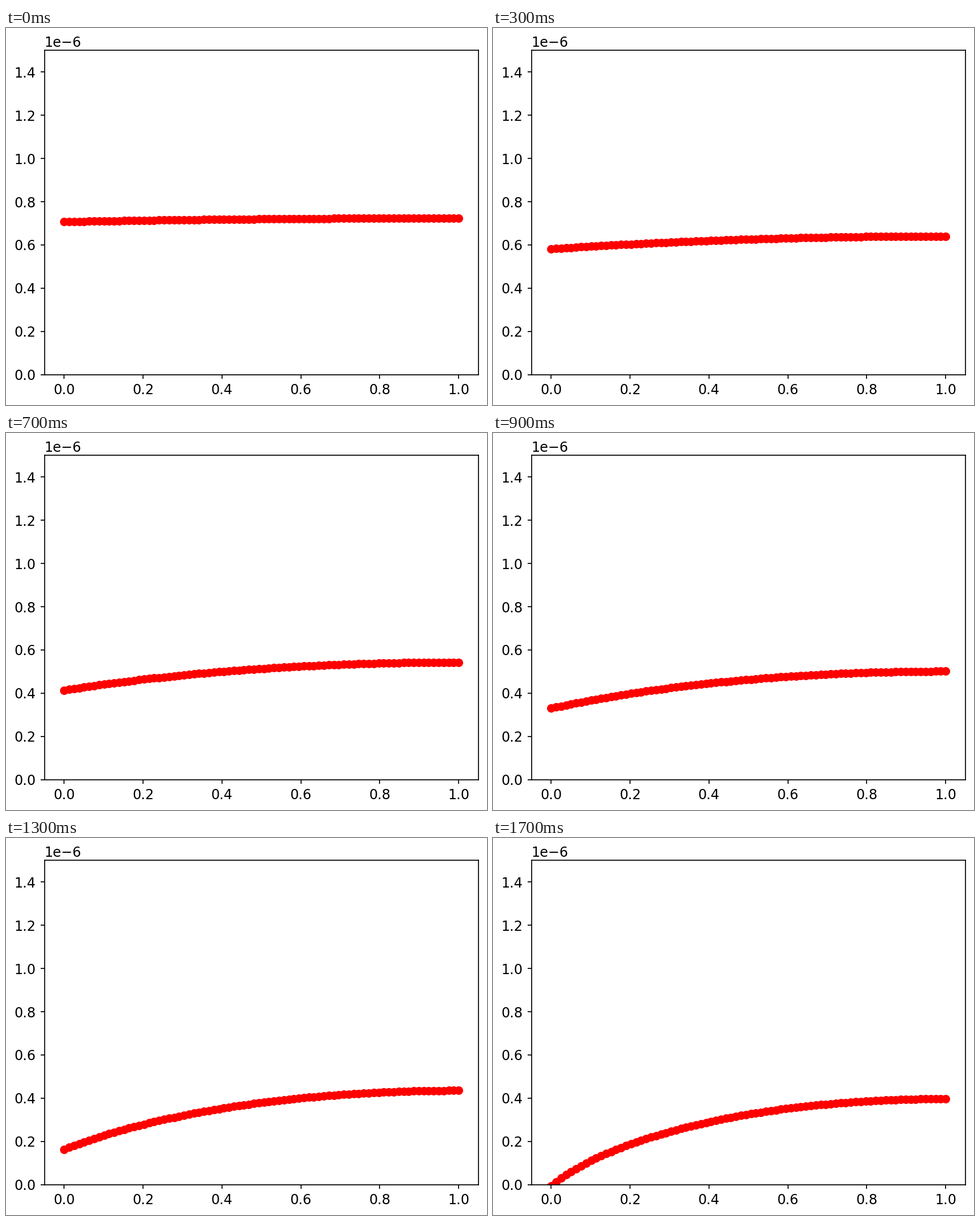
Write a matplotlib script that moves like this. It is 846 by 662 pixels and loops after 1800 ms.

```python
import numpy as np
import matplotlib.pyplot as plt
from matplotlib.animation import FuncAnimation

W, H, DPI = 846, 662, 154
LEFT, RIGHT, TOP, BOTTOM = 67.6, 830.8, 39.4, 608.6
FRAMES, INTERVAL = 18, 100

plt.rcParams["font.family"] = "DejaVu Sans"
plt.rcParams["font.size"] = 11.2

fig = plt.figure(figsize=((W + 1e-6) / DPI, (H + 1e-6) / DPI), dpi=DPI,
                 facecolor="white")
ax = fig.add_axes([LEFT / W, 1 - BOTTOM / H,
                   (RIGHT - LEFT) / W, (BOTTOM - TOP) / H])
ax.set_xlim(-0.05, 1.05)
ax.set_ylim(0, 1.5e-6)
ax.set_xticks(np.arange(0, 1.1, 0.2))
ax.set_yticks(np.arange(0, 1.5, 0.2) * 1e-6)

x = np.linspace(0, 1, 80)
dots, = ax.plot(x, np.zeros_like(x), "ro", markersize=6)


def profile(n):
    """Film height: draining at x = 0, flat at x = 1."""
    low = 0.7075 - 0.04195 * n
    high = 0.7240 - 0.02902 * n + 0.00036 * n**2 + 0.0000126 * n**3
    u = 1 - x
    # The parabola steepens near the drained end as time goes on
    bend = 0.015 * n * (1 - u**2)
    edge = 0.1 * (n / 17) ** 4 * (1 - u**12)
    drop = u**2 * (1 - bend - edge)
    return (high - (high - low) * drop) * 1e-6


def update(n):
    dots.set_ydata(profile(n))
    return dots,


anim = FuncAnimation(fig, update, frames=FRAMES, interval=INTERVAL,
                     init_func=lambda: update(0), repeat=True, repeat_delay=0)
plt.show()
```
